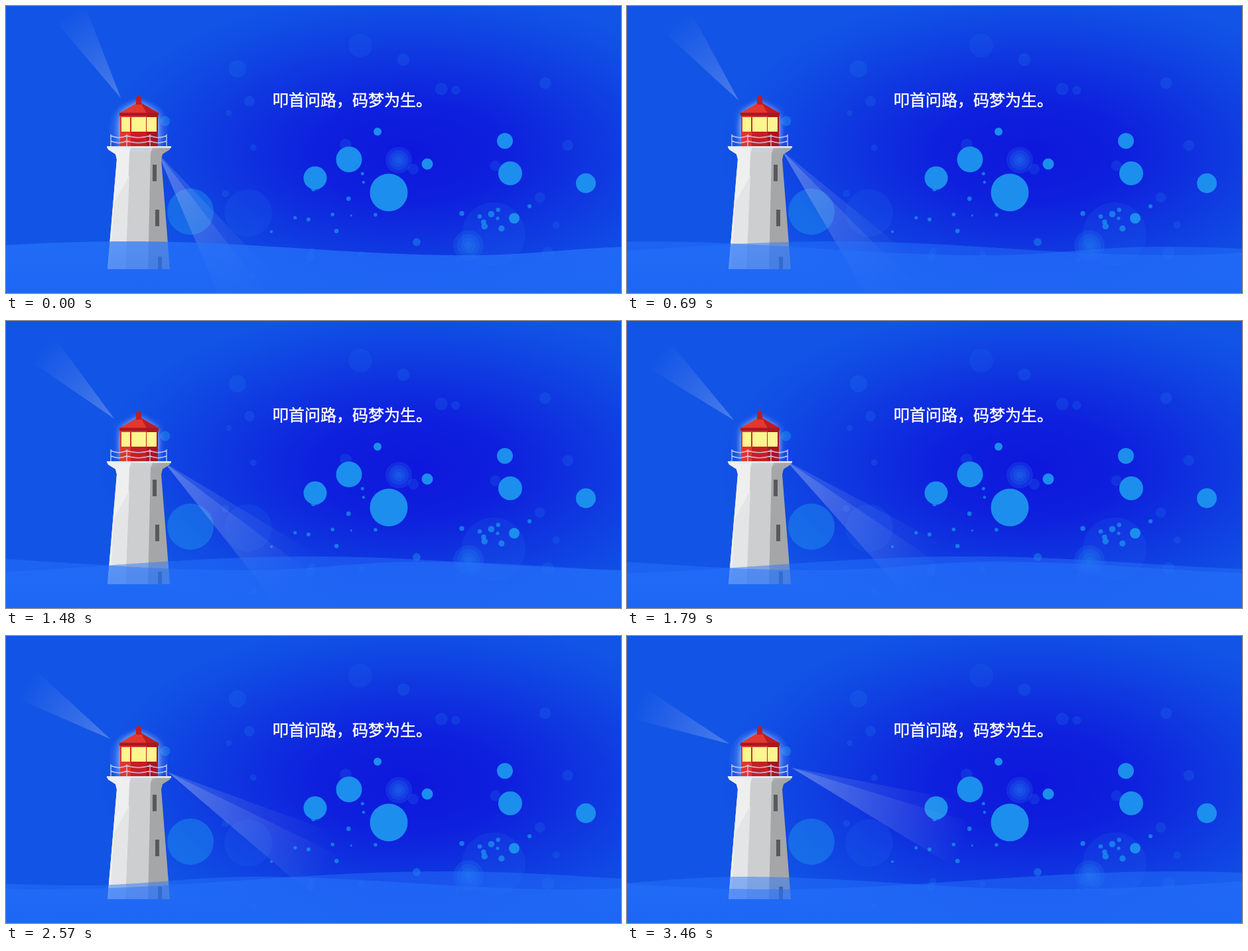
An HTML page with a canvas for the animation above (3.56 s loop, 927 by 434 pixels).

```html
<!DOCTYPE html>
<html lang="zh-CN">
<head>
<meta charset="utf-8">
<title>Lighthouse</title>
<style>
html, body { margin: 0; width: 100%; height: 100%; overflow: hidden; background: #1257e6; }
canvas { display: block; }
p {
  position: absolute; left: 402px; top: 129px; margin: 0;
  font: 500 24px/24px "Noto Sans CJK SC", "Noto Sans CJK", sans-serif;
  color: #fff; -webkit-text-stroke: .5px #fff; white-space: nowrap;
}
</style>
</head>
<body>
<canvas width="927" height="434"></canvas>
<p>叩首问路，码梦为生。</p>
<script>
const W = 927, H = 434, LOOP = 3560, TAU = 2 * Math.PI;
const PIVOT = { x: 201, y: 181, reach: 50 };
const ctx = document.querySelector('canvas').getContext('2d');

// Main bubbles: x, y, radius
const large = [[517,232,19.5], [466,260,17.5], [577,282,28.5], [560,190,6], [635,239,8.5],
  [752,204,12], [760,253,18], [874,268,15], [766,321,8]];
const pale = [[278,311,35], [240,174,7.5], [619,357,6]];

// Crests and troughs of the sea outline, repeating after PERIOD
const PERIOD = 1854;
const swell = [[-424,383], [185,356], [700,377], [960,364], [1430,383], [2039,356]];

let seed = 7;
function rand(min, max) {
  seed = seed * 16807 % 2147483647;
  return min + (max - min) * seed / 2147483647;
}

function scatter(n, x0, x1, y0, y1, r0, r1) {
  return Array.from({ length: n }, () => [rand(x0, x1), rand(y0, y1), rand(r0, r1)]);
}

const specks = [...scatter(12, 400, 570, 240, 350, 1.5, 3.5), ...scatter(9, 680, 800, 300, 350, 2, 5)];
const haze = scatter(20, 330, 880, 80, 410, 4, 10);

function poly(color, ...pts) {
  ctx.fillStyle = color;
  ctx.beginPath();
  for (let i = 0; i < pts.length; i += 2) ctx.lineTo(pts[i], pts[i + 1]);
  ctx.fill();
}

function box(color, x, y, w, h) {
  ctx.fillStyle = color;
  ctx.fillRect(x, y, w, h);
}

function bubbles(list, color) {
  ctx.fillStyle = color;
  for (const [x, y, r] of list) {
    ctx.beginPath();
    ctx.arc(x, y, r, 0, TAU);
    ctx.fill();
  }
}

function rings(x, y, r) {
  for (let k = 1; k > 0.2; k -= 0.25) bubbles([[x, y, r * k]], 'rgba(36,130,240,.2)');
}

function backdrop() {
  ctx.save();
  ctx.translate(610, 222);
  ctx.scale(1, 0.52);
  const g = ctx.createRadialGradient(0, 0, 0, 0, 0, 480);
  g.addColorStop(0, '#0e17dc');
  g.addColorStop(0.3, '#0e20dd');
  g.addColorStop(0.6, '#0f38e0');
  g.addColorStop(0.85, '#104ce4');
  g.addColorStop(1, '#1255e6');
  box(g, -610, -500, W, 1000);
  ctx.restore();
  bubbles([[735, 345, 48], [365, 313, 36], [534, 60, 18]], 'rgba(36,120,240,.14)');
  bubbles([[349, 95, 13], [367, 144, 8], ...haze], 'rgba(36,130,240,.2)');
  rings(592, 233, 20);
  rings(697, 362, 23);
  bubbles(pale, 'rgba(32,146,238,.46)');
  bubbles(specks, 'rgba(30,146,238,.75)');
  bubbles(large, '#1c8eee');
}

// Wedge along +x from the tip, between two angles in degrees
function wedge(from, to, length, alpha) {
  const rad = TAU / 360;
  const g = ctx.createRadialGradient(0, 0, 0, 0, 0, length);
  g.addColorStop(0, `rgba(190,205,245,${alpha})`);
  g.addColorStop(0.5, `rgba(170,190,240,${alpha * 0.55})`);
  g.addColorStop(1, 'rgba(160,185,240,0)');
  ctx.fillStyle = g;
  ctx.beginPath();
  ctx.moveTo(0, 0);
  ctx.arc(0, 0, length, from * rad, to * rad);
  ctx.fill();
}

function beams(t) {
  const angle = (56.3 - 10.2 * t) * TAU / 360;
  for (const side of [0, Math.PI]) {
    ctx.save();
    ctx.translate(PIVOT.x, PIVOT.y);
    ctx.rotate(angle + side);
    ctx.translate(PIVOT.reach, 0);
    if (side) wedge(-6.5, 12.5, 150, 0.34);
    else {
      wedge(-4, 10.5, 285, 0.42);
      wedge(-10, -4, 270, 0.2);
    }
    ctx.restore();
  }
}

function halo(r) {
  const g = ctx.createRadialGradient(200, 186, 22, 200, 186, r);
  g.addColorStop(0, 'rgba(180,210,250,.45)');
  g.addColorStop(0.5, 'rgba(140,185,250,.2)');
  g.addColorStop(1, 'rgba(120,170,250,.04)');
  bubbles([[200, 186, r]], g);
}

function tower() {
  poly('#a5a6a8', 152,212, 249,212, 247,217, 236,224, 234,232, 247,398, 153,398, 167,232, 165,224, 154,217);
  ctx.save();
  ctx.clip();
  poly('#cdced0', 150,212, 222,212, 218,222, 214,398, 150,398);
  poly('#efefef', 150,212, 189,212, 186,222, 180,398, 150,398);
  poly('#e4e5e6', 186,256, 180,398, 157,398, 163,298);
  ctx.restore();
  box('#eaeaeb', 152, 212, 97, 2.5);
  for (const [x, y] of [[221, 240], [225, 308], [229, 379]]) box('#58595b', x, y, 6, Math.min(25, 398 - y));
}

function lantern() {
  ctx.save();
  ctx.shadowColor = 'rgba(215,230,255,.75)';
  ctx.shadowBlur = 10;
  box('#c41f25', 172, 164, 57, 48);
  poly('#e2382f', 200,145, 230,162, 171,162);
  ctx.restore();
  box('#e0352e', 172, 164, 16, 48);
  box('#a91420', 212, 164, 17, 48);
  for (const [x, w] of [[174, 13], [189, 22], [212, 15]]) box('#fdf58e', x, 168, w, 22);
  poly('#bf1c24', 203,146, 230,162, 212,162);
  box('#a81722', 171, 161.5, 59, 4.5);
  poly('#bd1e25', 196,149, 196,139, 198,136, 202,136, 204,139, 204,149);
}

function railing() {
  const posts = [158, 182, 217, 242];
  ctx.strokeStyle = 'rgba(222,222,255,.75)';
  ctx.lineWidth = 1.5;
  ctx.beginPath();
  posts.forEach((x, i) => {
    const next = posts[i + 1];
    ctx.moveTo(x, 194);
    ctx.lineTo(x, 212);
    if (!next) return;
    for (const y of [196, 204]) {
      ctx.moveTo(x, y);
      ctx.quadraticCurveTo((x + next) / 2, y + 6, next, y);
    }
  });
  ctx.stroke();
}

function seaLevel(x) {
  x = (x % PERIOD + PERIOD) % PERIOD;
  const i = swell.findIndex(p => p[0] > x);
  const [x0, y0] = swell[i - 1], [x1, y1] = swell[i];
  return y0 + (y1 - y0) * (1 - Math.cos((x - x0) / (x1 - x0) * Math.PI)) / 2;
}

function sea(shift) {
  const g = ctx.createLinearGradient(0, 355, 0, H);
  g.addColorStop(0, 'rgba(38,116,252,.46)');
  g.addColorStop(1, 'rgba(34,108,248,.52)');
  ctx.fillStyle = g;
  ctx.beginPath();
  ctx.moveTo(0, H);
  for (let x = 0; x <= W + 3; x += 3) ctx.lineTo(x, seaLevel(x + shift));
  ctx.lineTo(W + 3, H);
  ctx.fill();
}

function draw(now) {
  const t = now % LOOP / 1000;
  backdrop();
  beams(t);
  halo(40 + 8 * Math.cos((t - 3.1) / 3.56 * TAU));
  tower();
  lantern();
  railing();
  sea(-185 * t);
  sea(228 * t);
}

const start = performance.now();
function tick() {
  draw(performance.now() - start);
  requestAnimationFrame(tick);
}
tick();
</script>
</body>
</html>
```
